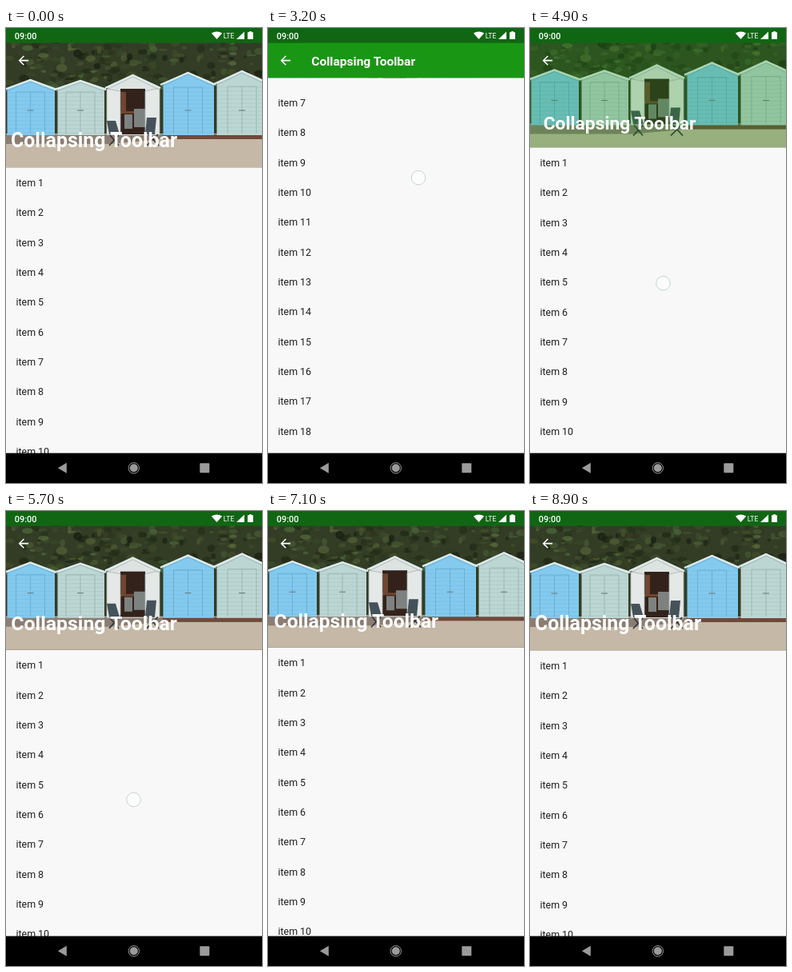
An HTML page that plays this animation: 320x569 px, repeating every 9 s.

```html
<!DOCTYPE html>
<html lang="en">
<head>
<meta charset="utf-8">
<title>Collapsing Toolbar</title>
<style>
  html, body { margin: 0; width: 100%; height: 100%; overflow: hidden; background: #f8f8f8; }
  svg { display: block; }
  #stage { width: 100vw; height: 100vh; }
  text { font-family: Roboto, sans-serif; }
  #list text { font-size: 12.45px; fill: #1f1f1f; }
  #title { font-size: 24.9px; font-weight: 700; fill: #fff; }
</style>
</head>
<body>
<svg id="stage" viewBox="0 0 320 569">
  <rect width="320" height="569" fill="#f8f8f8"/>
  <g id="list"></g>

  <svg id="header" width="320" height="174">
    <g id="photo">
      <rect width="320" height="176" fill="#333c25"/>
      <g id="hedge"></g>
      <rect y="132" width="320" height="44" fill="#c6b8a6"/>
      <path d="M0 133H320V139H196L130 145H0Z" fill="#8c7d72"/>
      <path d="M196 133H320V139H196Z" fill="#70493a"/>
      <g id="huts"></g>
      <g fill="none" stroke="#2f363c" stroke-width="1.6">
        <path d="M129 147L141 134M141 147L130 134M176 147L190 133M191 147L178 133"/>
      </g>
      <path d="M126 116H137L142 133H129Z M176 112H188L186 133H174Z" fill="#46525a"/>
    </g>
    <rect id="scrim" width="320" height="175" fill="#1a9615"/>
  </svg>

  <path fill="#fff" transform="translate(12.5 31.3) scale(.7778)"
    d="M20 11H7.83l5.59-5.59L12 4l-8 8 8 8 1.41-1.41L7.83 13H20z"/>
  <text id="title">Collapsing Toolbar</text>

  <rect width="320" height="18.7" fill="#116614"/>
  <g fill="#fff">
    <text x="10.8" y="13.6" font-size="10.9" font-weight="500">09:00</text>
    <path d="M263.5 14L256.8 6.6Q263.5 2.2 270.2 6.6Z"/>
    <text x="271.8" y="13" font-size="8.6">LTE</text>
    <path d="M298 4.5V14H288Z"/>
    <path d="M304 4.3H307V5.3H309V14H302V5.3H304Z"/>
  </g>

  <rect y="531.6" width="320" height="38" fill="#000"/>
  <g fill="#9b9b9b">
    <path d="M64.8 550.3L75.8 543.8V556.8Z"/>
    <circle cx="159.8" cy="550.3" r="5"/>
    <circle cx="159.8" cy="550.3" r="6.7" fill="none" stroke="#9b9b9b"/>
    <rect x="242.3" y="544.3" width="12" height="12" rx="1"/>
  </g>

  <circle id="touch" r="8.8" fill="#fff" fill-opacity=".6" stroke="#c3d4d7"/>
</svg>

<script>
const $ = id => document.getElementById(id);
const LOOP = 9000, STEP = 100;
const EXPANDED = 174.2, RANGE = 112, ROW = 37.33;

// Each swipe glides to a scroll offset; y is where the finger lands
const swipes = [
  { start: 1900, time: 900, to: 224, y: 361 },
  { start: 2900, time: 1040, to: 380, y: 287 },
  { start: 3600, time: 550, to: RANGE, y: 200 },
  { start: 4150, time: 1900, to: 0, y: 232 },
  { start: 5700, time: 700, to: 165, y: 361 },
  { start: 6400, time: 970, to: 0, y: 200 },
  { start: 7200, time: 500, to: 140, y: 361 },
  { start: 7700, time: 715, to: 0, y: 192.5 }
];

const mix = (a, b, k) => a + (b - a) * k;
const clamp = v => Math.min(1, Math.max(0, v));
const easeOut = u => 1 - (1 - u) ** 3;

function glide(swipe, from, t) {
  return mix(from, swipe.to, easeOut(clamp((t - swipe.start) / swipe.time)));
}

// Scroll offset at t, and the finger position while it touches the screen
function pose(t) {
  const begun = swipes.filter(s => s.start <= t);
  const last = begun.pop();
  if (!last) return { scroll: 0 };
  const from = begun.reduce((pos, s, i) => glide(s, pos, swipes[i + 1].start), 0);
  const scroll = glide(last, from, t);
  const held = t - last.start < last.time * .45;
  return {
    scroll,
    finger: held && { x: 151 + 37 * ((8000 - t) / 4800) ** 2, y: last.y + from - scroll }
  };
}

function hut(left, right, peak, eave, body, line, open) {
  const mid = (left + right) / 2, l = left + 3.5, r = right - 2;
  let planks = '';
  for (let y = eave + 5; y < 132; y += 5) planks += `M${l} ${y}H${r}`;
  const door = open
    ? `<rect x="143" y="76" width="31" height="57" fill="#33221b"/>
       <path d="M144 80H150V105H144Z M143 104H174V107H143Z" fill="#6f4630"/>
       <path d="M160 101H174V124H160Z M148 108H158V126H148Z" fill="#7d8280"/>
       <path d="M126 76L143 79V131L126 134Z M174 79L192 75V134L174 131Z"
         fill="#e4e8e7" stroke="${line}" stroke-width=".8"/>`
    : `<path d="M${mid - 18} 132V${eave + 4}H${mid + 18}V132M${mid} ${eave + 4}V132"
         fill="none" stroke="${line}" stroke-width=".8"/>
       <path d="M${mid - 4} 103H${mid + 4}" stroke="#65777c"/>`;
  return `<path d="M${l} 134V${eave}L${mid} ${peak}L${r} ${eave}V134Z" fill="${body}"/>
    <path d="${planks}" stroke="${line}" stroke-width=".5" opacity=".6"/>${door}
    <path d="M${left} ${eave + 1}L${mid} ${peak + 1}L${right} ${eave + 1}"
      fill="none" stroke="#dfeaea" stroke-width="2.4"/>
    <path d="M${left + 2} ${eave + 3}L${mid} ${peak + 3}L${right - 2} ${eave + 3}"
      fill="none" stroke="${line}" stroke-width=".8"/>`;
}

function build() {
  let seed = 11;
  const rnd = () => (seed = seed * 16807 % 2147483647) / 2147483647;
  $('hedge').innerHTML = Array.from({ length: 220 }, () =>
    `<ellipse cx="${rnd() * 320}" cy="${14 + rnd() * 62}" rx="${2 + rnd() * 5}"
      ry="${1 + rnd() * 4}" fill="hsl(${75 + rnd() * 25} 28% ${9 + rnd() * 24}%)"
      opacity=".75"/>`).join('');

  const blue = ['#84caee', '#62aad2'], mint = ['#bcd6d3', '#94b1af'];
  $('huts').innerHTML =
    hut(-2, 63, 64, 76, ...blue) + hut(61, 125, 65, 76, ...mint) +
    hut(124, 193, 58, 74, '#dde3e1', '#a9b3b1', true) +
    hut(193, 262, 55, 70, ...blue) + hut(260, 330, 53, 69, ...mint);

  $('list').innerHTML = Array.from({ length: 30 }, (_, i) =>
    `<text x="12.45" y="${198 + i * ROW}">item ${i + 1}</text>`).join('');
}

function draw(t) {
  const { scroll, finger } = pose(t);
  const shift = Math.min(scroll, RANGE), k = shift / RANGE;

  $('list').setAttribute('transform', `translate(0 ${-scroll})`);
  $('header').setAttribute('height', EXPANDED - shift);
  $('photo').setAttribute('transform', `translate(0 ${-shift / 2})`);
  $('scrim').setAttribute('opacity', clamp((scroll - 14) / 40));
  $('title').setAttribute('transform',
    `translate(${mix(6, 54.2, k)} ${mix(149.4, 46.7, k)}) scale(${mix(1, .625, k)})`);

  $('touch').setAttribute('visibility', finger ? 'visible' : 'hidden');
  if (finger) $('touch').setAttribute('transform', `translate(${finger.x} ${finger.y})`);
}

build();
const start = performance.now();
function tick() {
  const t = (performance.now() - start) % LOOP;
  draw(Math.floor(t / STEP) * STEP);
  requestAnimationFrame(tick);
}
tick();
</script>
</body>
</html>
```
